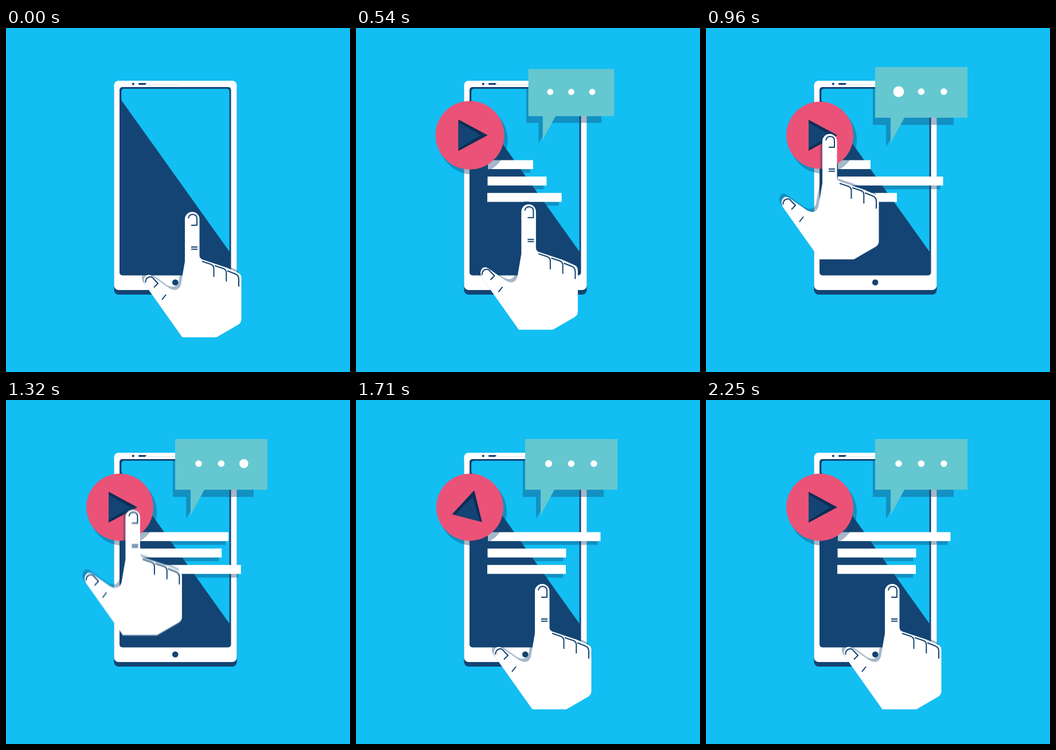
An HTML page for the animation above (2.34 s loop, 600x600 px).

```html
<!DOCTYPE html>
<html>
<head>
<meta charset="utf-8">
<style>
  html, body { margin: 0; height: 100%; overflow: hidden; background: #12bef2; }
  svg { display: block; width: 100vw; height: 100vh; }
  .navy { fill: #144473; }
  .white { fill: #fff; }
  .shade { fill: #144473; opacity: .38; }
  .ink { fill: none; stroke: #144473; stroke-width: 2; stroke-linejoin: round; }
</style>
</head>
<body>
<svg viewBox="0 0 600 600">
  <defs>
    <path id="palm" d="M307.5 539.5L243 448.5Q238.5 440 243 433.5Q247 428 254.5 432.5L285 454Q300 462 305 448L312 407V333.5A12.5 12.5 0 0 1 337.5 333.5V395Q337 402 343 404L385 418L405 427Q410.5 429.5 410.5 436V508Q410.5 514 405 517.5L367 539.5Z"/>
    <filter id="smear" filterUnits="userSpaceOnUse" x="200" y="290" width="250" height="280" color-interpolation-filters="sRGB">
      <feGaussianBlur id="blur"/>
    </filter>
  </defs>

  <g id="phone">
    <rect class="navy" x="188.5" y="100" width="214" height="365" rx="8"/>
    <rect class="white" x="188.5" y="92" width="214" height="365" rx="8"/>
    <circle class="navy" cx="221.8" cy="97.6" r="2.1"/>
    <path class="navy" d="M232.5 96H245L243 99.2H232.5A1.6 1.6 0 0 1 232.5 96Z"/>
    <path d="M244 99H302" stroke="#c9d6e2" stroke-width=".8"/>
    <rect class="navy" x="198" y="103" width="194.5" height="328.5" rx="5"/>
    <path d="M201.3 126V111Q201.3 106 206 106H385Q389.7 106 389.7 111V390Z" fill="#12bef2"/>
    <circle class="navy" cx="295.2" cy="443.7" r="5.3"/>
  </g>

  <g id="bars"></g>

  <g id="play">
    <circle class="shade" cx="204" cy="195" r="59"/>
    <circle cx="198.6" cy="187" r="58.5" fill="#eb5277"/>
    <g id="arrow">
      <path d="M179 160L229 187L179 214Z" fill="#0c2e55"/>
      <path class="navy" d="M179 165L217 187L179 210Z"/>
    </g>
  </g>

  <g id="bubble">
    <path class="shade" d="M291 104H432V169H338L314 207V169H291Z"/>
    <path d="M295 68H456V156.5H346L322 201V156.5H295Z" fill="#65c7d0"/>
    <g id="dots" class="white"></g>
  </g>

  <g id="hand">
    <use href="#palm" class="shade" x="-4" y="-5.6"/>
    <use href="#palm" class="white"/>
    <path class="ink" d="M318 332Q319 325 326 325Q333 326 333 332V344H323M323 382H334M323 385.8H334
      M243.5 444Q243 437 249 434.5Q254 433 257 437L265 445.5L258 452.5M279 465L272 474
      M342 407L357 412Q362.5 414 362.5 420V434M364 414.5L379 419.5Q384.3 421.5 384.3 427V442
      M386 423.5L400 429Q406 431.5 406 438V451"/>
  </g>
</svg>
<script>
const LOOP = 2340, STEP = 30, LAST = 2250;
const $ = id => document.getElementById(id);

function add(parent, tag, attrs) {
  const el = document.createElementNS('http://www.w3.org/2000/svg', tag);
  for (const name in attrs) el.setAttribute(name, attrs[name]);
  return parent.appendChild(el);
}

// Eased progress from 0 to 1 between two times
function ease(t, from, to) {
  const u = Math.min(1, Math.max(0, (t - from) / (to - from)));
  return u * u * (3 - 2 * u);
}

// Three bars grow one after the other, then settle at new widths together
const bars = [
  { delay: 20, widths: [88, 57, 157, 196.5] },
  { delay: 45, widths: [124, 184, 147, 137] },
  { delay: 0, widths: [138, 104, 182, 137] }
].map((bar, i) => {
  const x = 230 - i / 2, y = 230.5 + 28.6 * i, height = 15.6;
  const shapes = [
    add($('bars'), 'rect', { x: x - 5, y: y + 6.5, height, class: 'shade' }),
    add($('bars'), 'rect', { x, y, height, class: 'white' })
  ];
  return { ...bar, shapes };
});

function barWidth({ delay, widths: [first, second, third, last] }, t) {
  return first * ease(t, 200 + delay, 600 + delay)
    + (second - first) * ease(t, 750, 930)
    + (third - second) * ease(t, 960, 1290)
    + (last - third) * ease(t, 1290, 1600);
}

const dots = [0, 1, 2].map(i => add($('dots'), 'circle', { cx: 336 + 39.4 * i, cy: 111 }));

// A wave of two swells runs along the dots
function dotRadius(i, t) {
  const swell = peak => (1 + Math.cos(Math.PI * Math.min(1, Math.abs(t - peak) / 172))) / 2;
  const peak = 1030 + 95 * i;
  return 5.8 + 5.6 * (swell(peak) + swell(peak + 825));
}

// Each move adds its own shift; together they bring the hand home
const moves = [
  { from: 30, to: 300, x: -34, y: -35 },
  { from: 360, to: 570, x: 11, y: 23 },
  { from: 610, to: 960, x: -86, y: -124 },
  { from: 1260, to: 1705, x: 109, y: 136 }
];
const handAt = (axis, t) => moves.reduce((sum, m) => sum + m[axis] * ease(t, m.from, m.to), 0);
const smear = (axis, t) => .3 * Math.abs(handAt(axis, t + 7.5) - handAt(axis, t - 7.5));

const pop = (t, start) => 1.16 * ease(t, start, start + 210) - .16 * ease(t, start + 210, start + 310);
const scaleAt = (x, y, s) => `translate(${x} ${y}) scale(${s}) translate(${-x} ${-y})`;
const transform = (id, value) => $(id).setAttribute('transform', value);

function draw(t) {
  for (const bar of bars)
    for (const shape of bar.shapes) shape.setAttribute('width', barWidth(bar, t));
  dots.forEach((dot, i) => dot.setAttribute('r', dotRadius(i, t)));
  transform('play', scaleAt(198.6, 187, pop(t, 375)));
  transform('bubble', scaleAt(375, 118, pop(t, 390)));
  transform('arrow', `rotate(${360 * ease(t, 1335, 1867)} 198.6 187)`);
  transform('hand', `translate(${handAt('x', t)} ${handAt('y', t)})`);

  const blur = [smear('x', t), smear('y', t)];
  $('blur').setAttribute('stdDeviation', blur.join(' '));
  $('hand').setAttribute('filter', Math.max(...blur) > .1 ? 'url(#smear)' : 'none');
}

let start;
function tick(now) {
  start ??= now;
  draw(Math.min(LAST, Math.floor((now - start) % LOOP / STEP) * STEP));
  requestAnimationFrame(tick);
}
draw(0);
requestAnimationFrame(tick);
</script>
</body>
</html>
```
